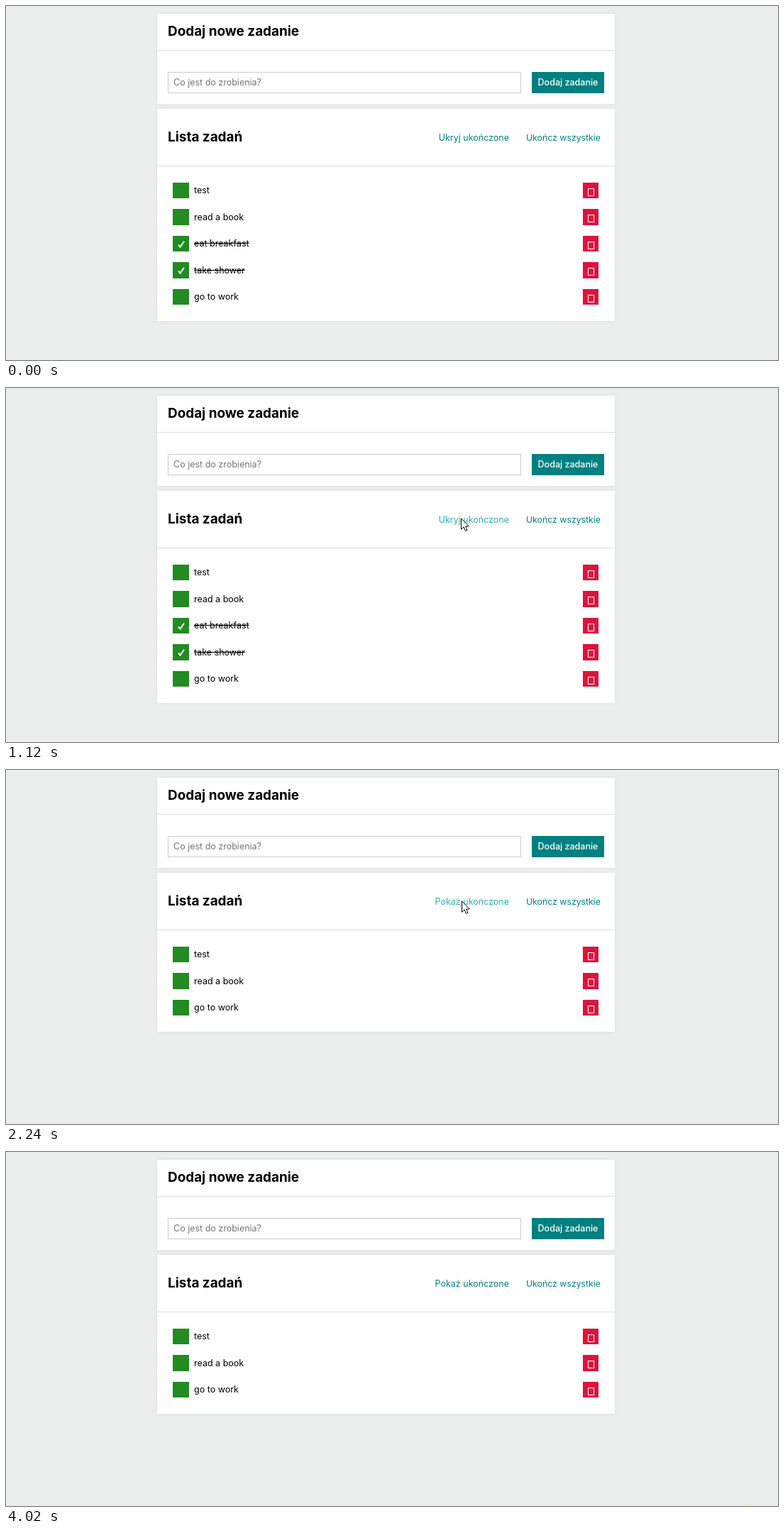
These frames come from a looping animation (1088 px wide and 499 px high, 4.15 s). An HTML page:

```html
<!DOCTYPE html>
<html lang="pl">
<head>
<meta charset="utf-8">
<title>Lista zadań</title>
<style>
  html, body { margin: 0; width: 100%; height: 100%; overflow: hidden; }
  body {
    position: relative;
    background: #eceeee;
    color: #000;
    font: 400 12.5px/25px Inter, "Open Sans", sans-serif;
    font-optical-sizing: none;
    white-space: nowrap;
  }
  body * { box-sizing: border-box; }
  .panel, .panel *, .cursor, .click { position: absolute; }

  .panel { left: 213px; width: 645px; background: #fff; box-shadow: 0 0 5px #ddd; }
  .add { top: 11px; height: 127px; }
  .tasks { top: 145px; height: 299px; animation: shrink 4150ms step-end infinite; }
  h2 { left: 15px; margin: 0; font-size: 18.9px; line-height: 25px; font-weight: 700; }
  .add h2 { top: 12px; }
  .tasks h2 { top: 27px; }
  hr { left: 0; width: 100%; height: 1px; margin: 0; border: 0; background: #ddd; }
  .add hr { top: 51px; }
  .tasks hr { top: 80px; }

  .field {
    left: 15px; top: 82px; width: 498px; height: 30px;
    border: 1px solid #ccc; padding-left: 7px;
    color: #757575; line-height: 27px;
  }
  .button {
    left: 528px; top: 82px; width: 102px; height: 30px;
    background: teal; color: #fff; font-weight: 500;
    line-height: 29px; text-align: center;
  }

  .link { top: 28px; color: teal; }
  .toggle { right: 149px; animation: hover 4150ms linear infinite; }
  .toggle span { right: 0; top: 0; }
  .all { right: 20px; font-size: 12.3px; }
  .before { animation: leave 4150ms step-end infinite; }
  .after { animation: enter 4150ms step-end infinite; }

  .row { left: 0; top: calc(103.5px + 37.5px * var(--i)); width: 100%; height: 22.5px; }
  .row span { left: 52px; top: -0.5px; line-height: 24px; }
  .box { left: 22px; top: 0; width: 22.5px; height: 22.5px; background: forestgreen; }
  .del { left: 600px; top: 0; width: 22px; height: 22.5px; background: crimson; }
  .del::after {
    content: ""; position: absolute; left: 7px; top: 8px;
    width: 7px; height: 9px; border: 1px solid #fff;
  }
  .done { animation: leave 4150ms step-end infinite; }
  .done span { text-decoration: line-through; }
  .done svg { left: 7px; top: 7px; }
  .last { animation: lift 4150ms step-end infinite; }

  .cursor { left: 0; top: 0; overflow: visible; animation: move 4150ms step-end infinite; }
  .click {
    left: -12px; top: -12px; width: 24px; height: 24px; border-radius: 50%;
    background: rgba(255, 255, 60, .75);
    animation: press 4150ms step-end infinite;
  }

  @keyframes shrink { 0% { height: 299px; } 44.337%, 100% { height: 224px; } }
  @keyframes lift { 0% { transform: none; } 44.337%, 100% { transform: translateY(-75px); } }
  @keyframes leave { 0% { visibility: visible; } 44.337%, 100% { visibility: hidden; } }
  @keyframes enter { 0% { visibility: hidden; } 44.337%, 100% { visibility: visible; } }

  @keyframes hover {
    0%, 13.734% { color: teal; }
    23.614%, 44.336% { color: #2cb0ac; }
    44.337% { color: teal; }
    53.975%, 62.168% { color: #2cb0ac; }
    73.493%, 100% { color: teal; }
  }

  @keyframes press {
    0% { visibility: hidden; transform: translate(642px, 184px); }
    41.204% { visibility: visible; transform: translate(642px, 184px); }
    44.337% { visibility: hidden; transform: translate(1044px, 509px); }
    96.867%, 100% { visibility: visible; transform: translate(1044px, 509px); }
  }

  @keyframes move {
    0% { visibility: hidden; transform: translate(616px, 362px); }
    4.096% { visibility: visible; transform: translate(616px, 362px); }
    5.542% { transform: translate(618px, 318px); }
    7.228% { transform: translate(621px, 274px); }
    8.915% { transform: translate(624px, 241px); }
    10.602% { transform: translate(626px, 219px); }
    12.289% { transform: translate(629px, 204px); }
    13.734% { transform: translate(632px, 193px); }
    15.421% { transform: translate(634px, 188px); }
    17.108% { transform: translate(636px, 185px); }
    18.795% { transform: translate(638px, 184px); }
    20.481% { transform: translate(639px, 183px); }
    23.614% { transform: translate(640px, 183px); }
    26.987% { transform: translate(641px, 183px); }
    31.566% { transform: translate(642px, 184px); }
    62.168% { transform: translate(660px, 198px); }
    63.855% { transform: translate(765px, 290px); }
    65.301% { transform: translate(890px, 395px); }
    66.746% { transform: translate(970px, 457px); }
    68.433% { transform: translate(995px, 473px); }
    70.120% { transform: translate(1006px, 480px); }
    71.807% { transform: translate(1012px, 485px); }
    73.493% { transform: translate(1016px, 487px); }
    75.903% { visibility: visible; transform: translate(1016px, 492px); }
    77.590%, 100% { visibility: hidden; transform: translate(1016px, 499px); }
  }
</style>
</head>
<body>
  <section class="panel add">
    <h2>Dodaj nowe zadanie</h2>
    <hr>
    <div class="field">Co jest do zrobienia?</div>
    <div class="button">Dodaj zadanie</div>
  </section>

  <section class="panel tasks">
    <h2>Lista zadań</h2>
    <div class="link toggle">
      <span class="before">Ukryj ukończone</span>
      <span class="after">Pokaż ukończone</span>
    </div>
    <div class="link all">Ukończ wszystkie</div>
    <hr>
    <div class="row" style="--i:0"><i class="box"></i><span>test</span><i class="del"></i></div>
    <div class="row" style="--i:1"><i class="box"></i><span>read a book</span><i class="del"></i></div>
    <div class="row done" style="--i:2">
      <i class="box"><svg width="10" height="10"><path d="M1 5.5 3.5 8.7 9 .8" fill="none" stroke="#fff" stroke-width="2"/></svg></i>
      <span>eat breakfast</span><i class="del"></i>
    </div>
    <div class="row done" style="--i:3">
      <i class="box"><svg width="10" height="10"><path d="M1 5.5 3.5 8.7 9 .8" fill="none" stroke="#fff" stroke-width="2"/></svg></i>
      <span>take shower</span><i class="del"></i>
    </div>
    <div class="row last" style="--i:4"><i class="box"></i><span>go to work</span><i class="del"></i></div>
  </section>

  <div class="click"></div>
  <svg class="cursor" width="12" height="19">
    <path d="M.5 .8V16.3L4.1 12.9 6.5 18.4 9 17.4 6.7 12H11.4Z" fill="#fff" stroke="#000"/>
  </svg>
</body>
</html>
```
